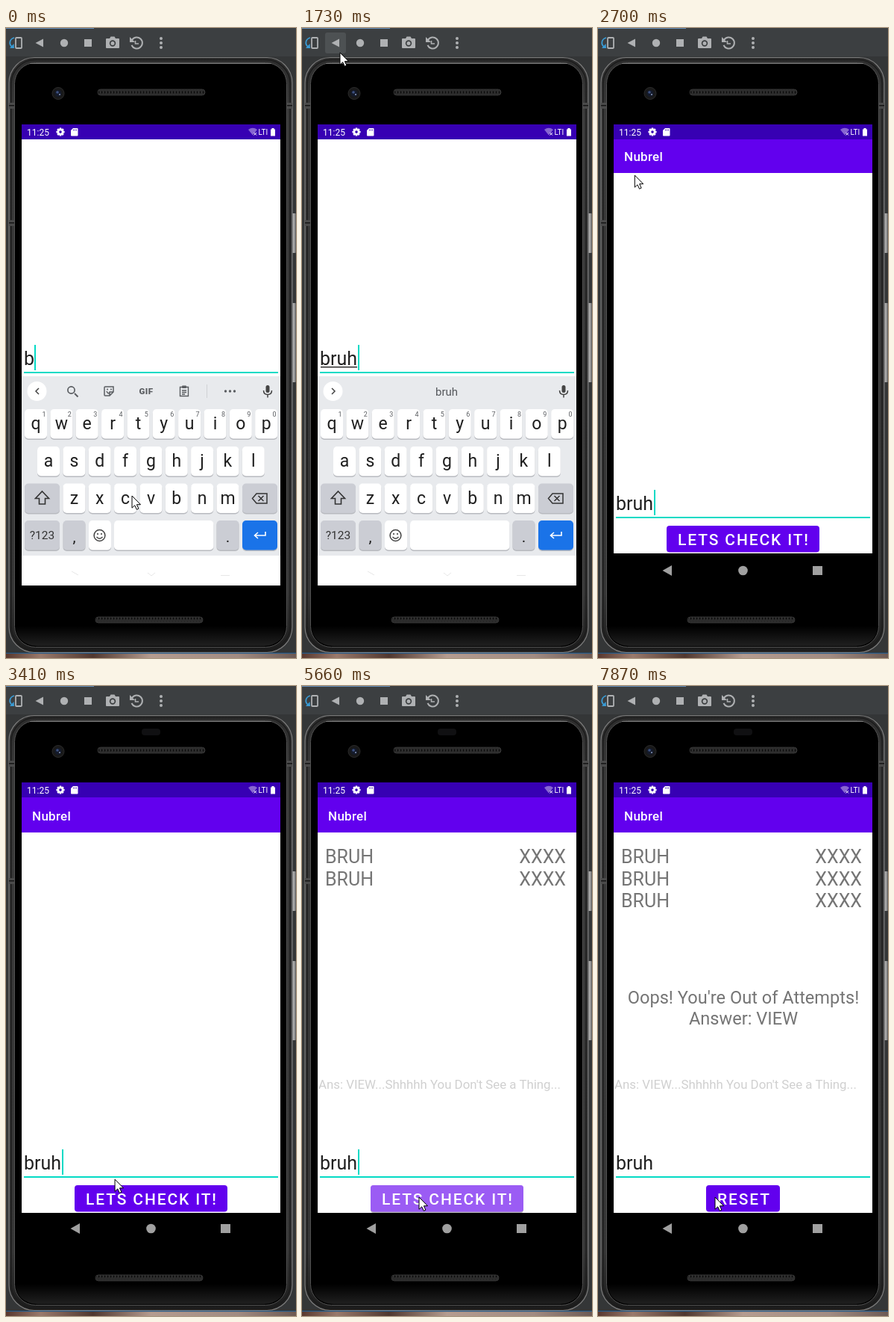
An HTML page that plays this animation: 389 by 843 pixels, repeating every 8 s.

```html
<!DOCTYPE html>
<html lang="en">
<head>
<meta charset="utf-8">
<title>Phone word game</title>
<style>
html, body { margin: 0; width: 100%; height: 100%; overflow: hidden; background: #343637; }
svg { display: block; width: 389px; height: 843px; font-family: Roboto, sans-serif; }
</style>
</head>
<body>
<svg id="stage" viewBox="0 0 389 843" xmlns="http://www.w3.org/2000/svg"></svg>
<script>
const LOOP = 8000;
const stage = document.getElementById('stage');

// markup helpers
const rect = (x, y, w, h, fill, r = 0, more = '') =>
  `<rect x="${x}" y="${y}" width="${w}" height="${h}" rx="${r}" fill="${fill}" ${more}/>`;
const disc = (x, y, r, fill, more = '') =>
  `<circle cx="${x}" cy="${y}" r="${r}" fill="${fill}" ${more}/>`;
const fillPath = (d, fill, more = '') => `<path d="${d}" fill="${fill}" ${more}/>`;
const line = (d, color, w = 1.5, more = '') =>
  `<path d="${d}" fill="none" stroke="${color}" stroke-width="${w}" ${more}/>`;
const label = (s, x, y, size, fill, more = '') =>
  `<text x="${x}" y="${y}" font-size="${size}" fill="${fill}" ${more}>${s}</text>`;
const MID = 'text-anchor="middle"';
const TEAL = '#03dac5';

const defs = `<defs>
  <linearGradient id="rim" x1="0" x2="0" y1="0" y2="1">
    <stop offset="0" stop-color="#2c2c2c"/><stop offset=".1" stop-color="#3a3a3a"/>
    <stop offset=".9" stop-color="#363636"/><stop offset="1" stop-color="#1c1c1c"/>
  </linearGradient>
  <linearGradient id="chin" x1="0" x2="0" y1="0" y2="1">
    <stop offset="0" stop-color="#000"/><stop offset="1" stop-color="#202020"/>
  </linearGradient>
  <linearGradient id="side" x1="0" x2="1" y1="0" y2="0">
    <stop offset="0" stop-color="#444"/><stop offset=".4" stop-color="#b0b0b0"/>
    <stop offset=".8" stop-color="#8a8a8a"/><stop offset="1" stop-color="#444"/>
  </linearGradient>
  <linearGradient id="desk" x1="0" x2="1" y1="0" y2="0">
    <stop offset="0" stop-color="#59382f"/><stop offset=".12" stop-color="#9a7a6c"/>
    <stop offset=".3" stop-color="#50372f"/><stop offset=".5" stop-color="#b59c90"/>
    <stop offset=".8" stop-color="#a18b82"/><stop offset="1" stop-color="#6d5a54"/>
  </linearGradient>
  <pattern id="mesh" width="4" height="8" patternUnits="userSpaceOnUse" y="2">
    <path d="M0 0L3 4L0 8M2 0L5 4L2 8" fill="none" stroke="#4c4c4c" stroke-width=".8"/>
  </pattern>
  <clipPath id="app"><rect x="21" y="149" width="347" height="557"/></clipPath>
  <clipPath id="screen"><rect x="21" y="149" width="347" height="597"/></clipPath>
  <clipPath id="btnClip"><rect id="btnShape" y="668" height="35.5" rx="4"/></clipPath>
</defs>`;

function toolbar() {
  const c = '#afb1b3';
  return rect(0, 0, 389, 38, '#3c3f41') + rect(0, 0, 118, 1, '#6690bd') +
    rect(31, 6, 28, 28, '#4d5153', 3, 'id="hover"') +
    `<rect x="13" y="13" width="8" height="14" rx="1" fill="none" stroke="${c}" stroke-width="1.8"/>` +
    line('M11 13C4 15 4 22 8 25', '#3a9bd4', 1.8) + fillPath('M5 27L11 27L10.500 21Z', '#3a9bd4') +
    fillPath('M39.5 20L50 14.5V25.5Z', c) + disc(78, 20, 5.2, c) + rect(105, 15, 10, 10, c) +
    fillPath('M135 14h4l1.500-2.500h5l1.500 2.500h4q1 0 1 1v11q0 1-1 1h-16q-1 0-1-1v-11q0-1 1-1z', c) +
    disc(143, 20.5, 4.2, '#3c3f41') + disc(143, 20.5, 2.5, c) +
    line('M169 16A7.500 7.500 0 1 1 168.500 23', c, 2) + fillPath('M166 12V19H173Z', c) +
    line('M173.500 17V21H178', c, 1.6) +
    [14, 20, 26].map(y => disc(208, y, 2, c)).join('');
}

function phone() {
  const speaker = (x, y) => rect(x, y, 144, 8, '#161616', 4) +
    rect(x, y, 144, 8, 'url(#mesh)', 4, 'stroke="#3a3a3a" stroke-width=".8"');
  return rect(383, 248, 6, 53, 'url(#side)', 1) + rect(383, 368, 6, 106, 'url(#side)', 1) +
    rect(4, 39.5, 380, 796, 'url(#rim)', 34, 'stroke="#7c7c7c" stroke-width="1.200"') +
    rect(7, 42.5, 374, 790, 'none', 32, 'stroke="#1c1c1c" stroke-width="1.500"') +
    rect(11.5, 46.5, 365, 782, '#000', 28, 'stroke="#515151" stroke-width="1"') +
    line('M32 47.500H356', '#777', 1) +
    fillPath('M13 800H375Q374 825 346 827H42Q14 825 13 800Z', 'url(#chin)') +
    [100, 257].map(y => rect(4, y, 7, 8, '#4a4a4a') + rect(4, y + 3, 7, 1.5, '#151515')).join('') +
    rect(377, 100, 7, 8, '#4a4a4a') + rect(377, 103, 7, 1.5, '#151515') +
    disc(70, 87.5, 8, '#191919', 'stroke="#2b2b2b"') + disc(70, 87.5, 4.5, '#141a2a') +
    disc(69, 86, 1.8, '#3d5080') + disc(72, 89, 1, '#8d9dc0') +
    speaker(123, 82) + speaker(120, 788) +
    rect(182, 57, 25, 9, '#101012', 4, 'id="sensor"') +
    rect(0, 836, 389, 1.2, '#235f94') + rect(0, 837.2, 389, 5.8, 'url(#desk)');
}

function statusBar() {
  const teeth = [0, 45, 90, 135].map(a =>
    rect(71.6, 133.6, 2.8, 11, '#fff', .5, `transform="rotate(${a} 73 139.100)"`)).join('');
  return rect(21, 129, 347, 20, '#3700b3') + label('11:25', 28, 144, 12, '#fff') +
    teeth + disc(73, 139.1, 4.2, '#fff') + disc(73, 139.1, 1.8, '#3700b3') +
    fillPath('M90 134h5.500q1 0 1 1v8.500q0 1-1 1h-7.500q-1 0-1-1v-6.500z', '#fff') +
    line('M90.500 135.500v2M92.500 135.500v2M94.500 135.500v2', '#3700b3', .8) +
    fillPath('M325 136Q331 131.500 337 136L331 143.500Z', '#fff', 'opacity=".4"') +
    line('M332.500 140l3.500 3.500m0-3.500l-3.500 3.500', '#fff', 1) +
    label('LTI', 338.5, 143, 10, '#fff') +
    fillPath('M355 135.500h1.500v-1.500h3v1.500h1.500v9h-6z', '#fff');
}

function appView() {
  const grey = '#757575';
  const rows = [0, 1, 2].map(i => `<g id="row${i}">` +
    label('BRUH', 31, 237 + i * 29.5, 25, grey) +
    label('XXXX', 354, 237 + i * 29.5, 25, grey, 'text-anchor="end"') + '</g>').join('');
  return `<g clip-path="url(#app)"><g id="view">` +
    rect(21, 149, 347, 556, '#fff') + rect(21, 149, 347, 47, '#6200ee') +
    label('Nubrel', 35, 179.5, 17, '#fff', 'font-weight="500" letter-spacing=".300"') + rows +
    `<g id="over">` + label("Oops! You're Out of Attempts!", 195, 425, 23.6, grey, MID) +
    label('Answer: VIEW', 195, 453, 23.6, grey, MID) + '</g>' +
    label("Ans: VIEW...Shhhhh You Don't See a Thing...", 22, 539, 16.85, '#d0d0d0', 'id="hint"') +
    label('', 24, 647, 25, '#212121', 'id="typed"') +
    rect(25, 649, 49, 1.4, '#212121', 0, 'id="under"') +
    rect(24, 656, 341, 2, TEAL) + rect(75, 620, 2, 34, TEAL, 0, 'id="caret"') +
    `<g id="shadow">` + rect(0, 670, 0, 36, '#000', 5, 'opacity=".12"') +
    rect(0, 669, 0, 36, '#000', 4, 'opacity=".18"') + '</g>' +
    rect(92, 668, 205, 35.5, '#6200ee', 4, 'id="btn"') +
    `<g clip-path="url(#btnClip)">` + disc(162, 686, 0, '#fff', 'id="ripple"') + '</g>' +
    label('', 107, 694, 21, '#fff', 'id="btnText" font-weight="500" letter-spacing="1.870"') +
    '</g></g>';
}

function keyboard() {
  const ink = '#1f1f1f', soft = '#5a5d61', dark = '#cbcdd4';
  const key = (x, y, w, fill = '#fff') => rect(x, y + 1, w, 40, '#b8babf', 5) + rect(x, y, w, 39.5, fill, 5);
  const letters = (s, x0, y, hint) => [...s].map((ch, i) => {
    const x = x0 + i * 34.35;
    return key(x - 15, y, 30) + label(ch, x, y + 27, 23, ink, MID) +
      (hint ? label((i + 1) % 10, x + 11, y + 10, 9, soft, MID) : '');
  }).join('');
  const tools = `<g id="tools">` +
    line('M44 482l-4 4 4 4', '#444') +
    line('M92 489l4.500 4.500', soft, 2) + disc(87.5, 484.5, 4.6, 'none', `stroke="${soft}" stroke-width="1.700"`) +
    line('M133 480h11v7l-5 5h-6q-1 0-1-1v-10q0-1 1-1M139 492v-5h5M135 486q1.500 4 4 2', soft) +
    disc(136, 483.5, 1, soft) + disc(141, 483.5, 1, soft) +
    label('GIF', 188, 490, 11.5, soft, MID + ' font-weight="900" letter-spacing=".500"') +
    line('M233.500 480.500h11v12h-11zM236 485h6M236 487.500h6M236 490h4', soft, 1.4) +
    rect(236, 478.5, 6, 3.5, soft, 1) + rect(269, 477, 1, 18, '#cfd1d5') +
    [294.5, 300.5, 306.5].map(x => disc(x, 486, 1.7, soft)).join('') + '</g>';
  return `<g clip-path="url(#screen)"><g id="keys">` +
    rect(21, 466, 347, 240, '#e8eaed') + rect(21, 706, 347, 40, '#fff') +
    line('M88 727l9 5M190 729l5 4 5-4M288 732.500h12', '#e7e7e7', 1) +
    disc(41.5, 486, 13, '#fff') + tools +
    `<g id="words">` + line('M40 482l4 4-4 4', '#444') + label('', 194, 492, 15, '#55585c', MID + ' id="guess"') + '</g>' +
    rect(348.5, 478, 5, 10, '#444', 2.5) + line('M345.500 485q0 5.500 5.500 5.500t5.500-5.500M351 490.500v4', '#444') +
    letters('qwertyuiop', 40, 510, true) + letters('asdfghjkl', 57, 560) +
    key(25, 609.5, 47, dark) + letters('zxcvbnm', 91.4, 609.5) + key(317, 609.5, 47, dark) +
    line('M48.500 620l9 9.500h-5v7.500h-8v-7.500h-5z', '#333', 1.6) +
    line('M336 623h14v13h-14l-5.500-6.500zM338.500 626l7 7m0-7l-7 7', '#333', 1.5) +
    key(25, 659, 47, dark) + label('?123', 48.5, 684, 15.5, '#333', MID) +
    key(76.5, 659, 30, dark) + label(',', 91.5, 688, 21, ink, MID) +
    key(111, 659, 30) + disc(125.5, 679, 7.4, 'none', 'stroke="#444" stroke-width="1.500"') +
    disc(123, 677, 1.1, '#444') + disc(128, 677, 1.1, '#444') + line('M121.500 681q4 4.500 8 0', '#444', 1.4) +
    key(145, 659, 133.5) + key(282.5, 659, 30, dark) + label('.', 297.5, 688, 21, ink, MID) +
    key(317, 659, 47, '#1a73e8') + line('M348 674v5h-14M338 675l-4.500 4 4.500 4', '#fff', 1.6) +
    '</g></g>';
}

const navBar = `<g id="nav" fill="#a0a0a0"><path d="M86.500 726L99 719V733Z"/>
  <circle cx="194.500" cy="726" r="6.300"/><rect x="288" y="720" width="13" height="12"/></g>`;
const pointer = `<path id="mouse" d="M0 0V16.200L3.700 12.800L6.300 18.300L8.900 17.100L6.400 11.700H11.500Z"
  fill="#fff" stroke="#000" stroke-width="1" stroke-linejoin="round"/>`;

stage.innerHTML = defs + toolbar() + phone() + rect(21, 149, 347, 597, '#000') +
  appView() + keyboard() + statusBar() + navBar + pointer;

const el = {};
stage.querySelectorAll('[id]').forEach(n => el[n.id] = n);

// timing
const clamp = v => Math.max(0, Math.min(1, v));
const span = (t, a, b) => clamp((t - a) / (b - a));
const put = (n, name, v) => n.setAttribute(name, v);
const show = (n, on) => put(n, 'visibility', on ? 'visible' : 'hidden');

const MOUSE = [ // time, x, y
  [880, 169, 626], [980, 172, 430], [1090, 136, 205], [1180, 70, 75],
  [1490, 70, 75], [1730, 51, 33], [1950, 46, 29], [2210, 45, 28],
  [2640, 45, 28], [2740, 52, 305], [2800, 70, 435], [2860, 92, 520],
  [2950, 129, 622], [3260, 129, 622], [3410, 146, 660], [3590, 157, 684]
];
const CARET = [[0, 960], [1490, 2090], [2440, 2950], [3390, 3900],
  [4430, 4930], [5430, 5930], [6430, 6930], [7370, 7870]];
const PRESS = [4000, 5330, 6500];

function mouseAt(t) {
  const i = MOUSE.findIndex(p => p[0] > t);
  if (i === 0) return MOUSE[0].slice(1);
  if (i < 0) return MOUSE[MOUSE.length - 1].slice(1);
  const [a, b] = [MOUSE[i - 1], MOUSE[i]], k = span(t, a[0], b[0]);
  return [a[1] + (b[1] - a[1]) * k, a[2] + (b[2] - a[2]) * k];
}

function setButton(reset) {
  const x = reset ? 145 : 92, w = reset ? 99 : 205;
  [el.btn, el.btnShape, ...el.shadow.children].forEach(n => { put(n, 'x', x); put(n, 'width', w); });
  put(el.btnText, 'x', x + 15);
  el.btnText.textContent = reset ? 'RESET' : 'LETS CHECK IT!';
}

function draw(t) {
  const count = t < 220 ? 1 : t < 320 ? 2 : t < 420 ? 3 : 4;
  el.typed.textContent = 'bruh'.slice(0, count);
  put(el.caret, 'x', [38, 46.5, 60.5, 75][count - 1]);
  show(el.caret, CARET.some(([a, b]) => t >= a && t < b));
  show(el.under, t >= 300 && t < 2420);
  put(el.under, 'width', t < 640 ? 36 : 49);

  const swap = t < 2420 ? span(t, 220, 400) : 0;
  put(el.tools, 'opacity', 1 - swap);
  put(el.words, 'opacity', swap);
  el.guess.textContent = t < 640 ? 'bru' : 'bruh';

  // view settles while the keyboard drops and fades
  const pan = 1 - (1 - span(t, 2452, 2725)) ** 2;
  put(el.view, 'transform', `translate(0 ${Math.round(-196 * (1 - pan))})`);
  const drop = span(t, 2450, 2700);
  put(el.keys, 'transform', `translate(0 ${110 * drop})`);
  put(el.keys, 'opacity', 1 - drop);
  put(el.nav, 'opacity', span(t, 2450, 2560));
  show(el.sensor, t >= 2800);
  show(el.hover, t >= 1640 && t < 2680);

  const done = PRESS.filter(p => t >= p + 150).length;
  for (let i = 0; i < 3; i++) show(el['row' + i], done > i);
  show(el.hint, done > 0);
  show(el.over, done > 2);
  setButton(done > 2);

  const start = PRESS.find(p => t >= p && t < p + 450);
  const age = start === undefined ? 450 : t - start;
  const glow = 1 - span(age, 335, 450);
  put(el.ripple, 'r', 12 + 130 * span(age, 0, 225));
  put(el.ripple, 'opacity', .36 * glow);
  put(el.shadow, 'opacity', glow * span(age, 0, 100));

  put(el.mouse, 'transform', `translate(${mouseAt(t).join(' ')})`);
}

const t0 = performance.now();
function frame() {
  draw((performance.now() - t0) % LOOP);
  requestAnimationFrame(frame);
}
frame();
</script>
</body>
</html>
```
